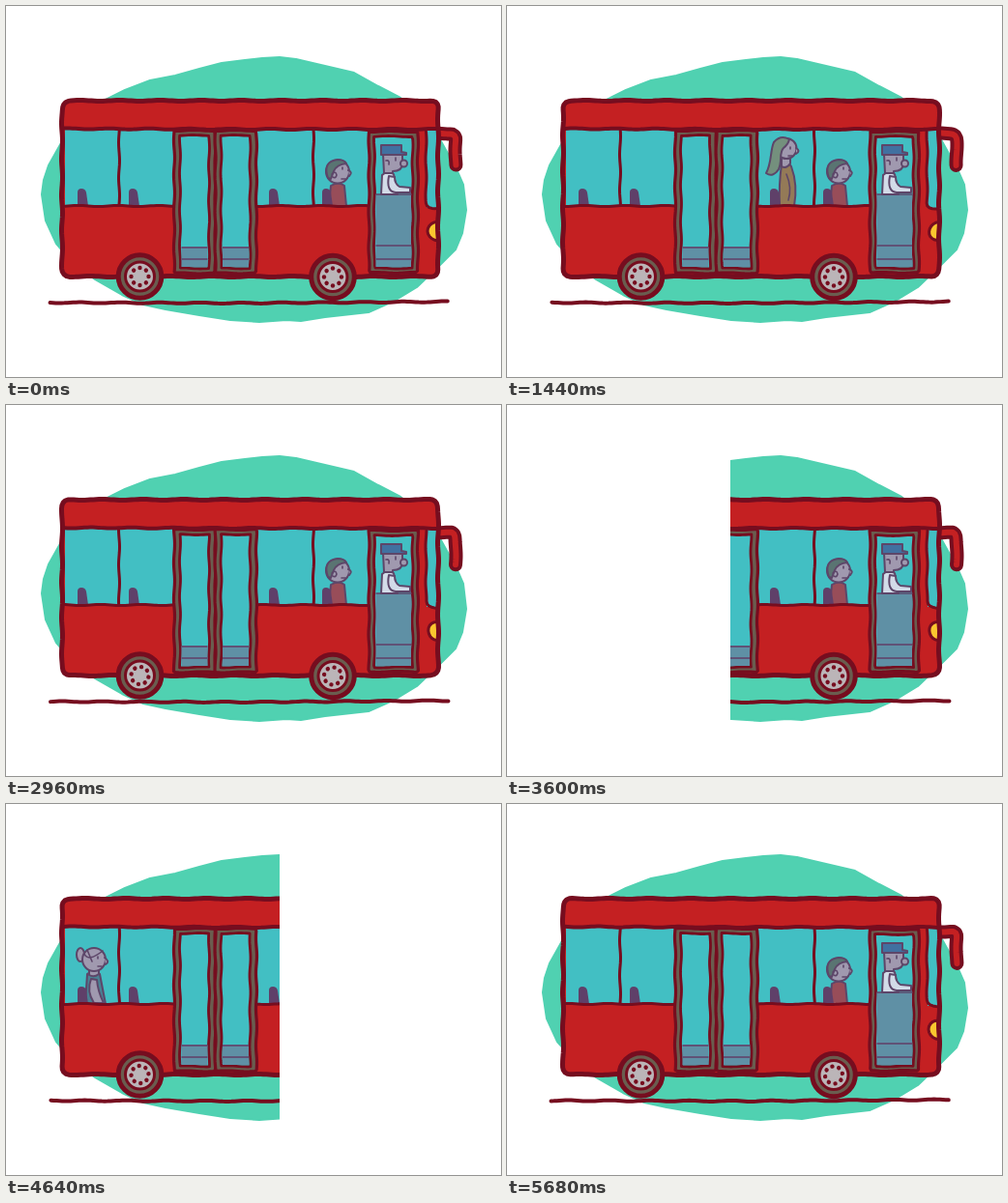
An HTML page for the animation above (5760 ms loop, 512 by 384 pixels).

```html
<!DOCTYPE html>
<html lang="en">
<head>
<meta charset="utf-8">
<title>Bus</title>
<style>
  html, body { margin: 0; height: 100%; overflow: hidden; background: #fff; }
  svg { display: block; width: 100vw; height: 100vh; }
  .ink { stroke: #760d1f; stroke-linecap: round; stroke-linejoin: round; }
  .line { fill: none; }
  .glass { fill: #42bfc3; }
  .frame { fill: #6a5d4f; stroke-width: 3.2; }
  .pane { fill: #42bfc3; stroke-width: 2.8; }
  .step { fill: none; stroke: #605276; stroke-width: 2.2; }
  .person { stroke: #5d4669; stroke-width: 2; stroke-linecap: round; stroke-linejoin: round; }
  .skin { fill: #a099af; }
  .thin { fill: none; stroke-width: 1.6; }
</style>
</head>
<body>
<svg viewBox="0 0 512 384">
  <defs>
    <path id="seat" d="M-4 18V4Q-4 0 0 0Q4 0 5 4L7 18Z" fill="#5f4069"/>
    <g id="door">
      <path class="ink frame" d="M0 129H42.500V276.500H0Z"/>
      <path class="ink pane" d="M6 134H36V271.500H6Z"/>
      <path d="M7.500 250H34.500V270H7.500Z" fill="#5f90a5"/>
      <path class="step" d="M7.500 250H34.500M7.500 262H34.500"/>
    </g>
    <g id="wheel">
      <circle r="22.300" fill="#6a5d4f" stroke="#760d1f" stroke-width="5"/>
      <circle r="15" fill="#bbb5b8" stroke="#760d1f" stroke-width="3"/>
      <g class="bolts" fill="#760d1f"></g>
    </g>
  </defs>

  <path fill="#50d1b1" stroke="#50d1b1" stroke-width="2" stroke-linejoin="round" d="M283 53L265 54 247 56 223 59 200 65 175 72 149 77 123 87 103 97 75 118 58 140 44 165 39 180 37 195 41 222 52 246 70 267 92 283 120 299 142 309 165 314 200 320 232 325 262 327 290 325 305 326 330 322 375 317 402 305 425 291 448 269 465 252 472 235 476 211 473 185 466 169 440 122 408 95 385 83 360 69 330 62 300 55Z"/>

  <path class="ink line" d="M46 307L250 307.500 457 306" stroke-width="4"/>
  <path class="ink line" d="M447 132H459Q465 132 465 139V165" stroke-width="14"/>
  <path class="ink line" d="M447 132H459Q465 132 465 139V165" stroke-width="6" style="stroke:#c42022"/>

  <rect x="58" y="98" width="389" height="182" rx="9" fill="#c42022"/>
  <path class="glass" d="M61 128H174V207H61ZM260 128H375V207H260ZM435 129H446V209H435Z"/>

  <g class="person">
    <path d="M334 207L336 186Q344 181 350 186L352 207Z" fill="#984d59"/>
    <circle class="skin" cx="343" cy="171.500" r="12"/>
    <path class="skin" d="M354 170Q359 172 355 176"/>
    <path d="M333 178Q327 161 343 159Q350 159 352 163Q342 164 339 171L336 179Z" fill="#5a7472"/>
    <path class="thin" d="M337 174Q341 170 342 175Q341 179 338 177M348 167V169M351 179H347"/>
  </g>

  <g class="person passenger">
    <path d="M282 207Q281 185 284 164Q290 159 294 166Q301 185 297 207Z" fill="#947a57"/>
    <path class="skin" d="M284 155V166Q289 169 293 163V155Z"/>
    <circle class="skin" cx="289" cy="147.500" r="10.500"/>
    <path class="skin" d="M299 147Q304 150 299 153"/>
    <path d="M292 138Q283 133 276 141C272 150 274 162 268 173Q275 178 281 169C285 160 281 152 286 147Q291 143 292 138Z" fill="#74907d"/>
    <path class="thin" d="M293 146V148M291 155H295M289 174Q295 188 291 201"/>
  </g>

  <g class="person passenger">
    <path d="M82 207L84 176Q91 170 97 176L103 207Z" fill="#498293"/>
    <ellipse class="skin" cx="77" cy="156" rx="4" ry="7"/>
    <path class="skin" d="M86 169V177Q91 180 96 176V169Z"/>
    <circle class="skin" cx="91" cy="161" r="12"/>
    <path class="skin" d="M102 159Q108 163 103 166"/>
    <path class="skin" d="M88 181Q83 194 91 206H101Q95 194 94 182Z"/>
    <path class="thin" d="M81 155Q85 164 100 152M84 151L89 163M95 158V160M95 168H99"/>
  </g>

  <use href="#seat" x="78" y="189"/>
  <use href="#seat" x="131" y="189"/>
  <use href="#seat" x="276" y="189"/>
  <use href="#seat" x="331" y="189"/>

  <g stroke-width="3">
    <path class="ink line" d="M117 129V206"/>
    <path class="ink line" d="M318 129V206"/>
    <path class="ink line" d="M61 207H174"/>
    <path class="ink line" d="M260 207H375"/>
  </g>
  <use href="#door" x="174"/>
  <use href="#door" x="216.500"/>

  <path class="ink frame" d="M375.500 130H426V276H375.500Z"/>
  <path class="ink pane" d="M381 135H420.500V271.500H381Z"/>
  <path d="M382.500 195H419V270H382.500Z" fill="#5f90a5"/>
  <path class="step" d="M382.500 248H419M382.500 262H419"/>
  <g class="person">
    <path d="M388 195L389 175Q394 170 401 174L405 195Z" fill="#d3dbe8"/>
    <path d="M396 176Q393 192 403 193H418V188L407 187Q402 184 402 177Z" fill="#d3dbe8"/>
    <path class="skin" d="M390 153H410V163Q410 171 400 171V173H391Z"/>
    <circle class="skin" cx="411.500" cy="163" r="3.500"/>
    <path d="M388 144H409V151L414 152V154H388Z" fill="#4170a0"/>
    <path class="thin" d="M403 157V160M393 160Q397 159 396 164M383 195H419"/>
  </g>

  <path class="ink" d="M446 224A9 9 0 0 0 446 243" fill="#fbc62f" stroke-width="3"/>
  <path class="ink line" d="M434.500 130V204Q435 210 446 210" stroke-width="3"/>
  <path class="ink line" d="M60 127L250 127.500 446 127.500" stroke-width="4"/>
  <path class="ink line" d="M67 98H438Q447 98 447 107V271Q447 280 438 280H67Q58 280 58 271V107Q58 98 67 98Z" stroke-width="5"/>
  <use href="#wheel" x="138.500" y="280"/>
  <use href="#wheel" x="338" y="280.500"/>

  <rect id="panel" width="647" height="384" fill="#fff"/>
</svg>
<script>
  const STEP = 80, STEPS = 72, POSES = 4;
  const WIPES = [12, 27, 42, 58];   // steps at which the panel has covered the right side
  const panel = document.getElementById('panel');
  const bolts = document.querySelector('.bolts');
  const [woman, granny] = document.querySelectorAll('.passenger');

  bolts.innerHTML = Array.from({ length: 8 }, (_, i) =>
    `<circle cx="9" r="2.2" transform="rotate(${i * 45})"/>`).join('');

  // Hand-drawn version of a path: resampled and nudged by smooth waves.
  function wobble(path, pose) {
    const length = path.getTotalLength(), count = Math.ceil(length / 3);
    const points = Array.from({ length: count + 1 }, (_, i) => {
      const { x, y } = path.getPointAtLength(length * i / count);
      const dx = .5 * Math.sin(y * .17 + x * .05 + pose * 2.1);
      const dy = .5 * Math.sin(x * .15 + y * .06 + pose * 2.7);
      return `${(x + dx).toFixed(2)} ${(y + dy).toFixed(2)}`;
    });
    return `M${points.join('L')}${/Z$/.test(path.getAttribute('d')) ? 'Z' : ''}`;
  }

  const inked = [...document.querySelectorAll('.ink')].map(path => ({
    path, poses: Array.from({ length: POSES }, (_, pose) => wobble(path, pose))
  }));

  const show = (el, on) => el.setAttribute('visibility', on ? 'visible' : 'hidden');

  function draw(step) {
    const wipe = WIPES.find(s => step >= s - 1 && step <= s + 4);
    panel.setAttribute('x', wipe === undefined ? 600 : 283 - 233 * (step - wipe));
    const scene = WIPES.filter(s => step >= s + 2).length;
    show(woman, scene === 1);
    show(granny, scene === 3);
    bolts.setAttribute('transform', `rotate(${step * 10})`);
    for (const { path, poses } of inked) path.setAttribute('d', poses[step % POSES]);
  }

  let last = -1;
  function tick() {
    const step = Math.floor(performance.now() / STEP) % STEPS;
    if (step !== last) draw(last = step);
    requestAnimationFrame(tick);
  }
  tick();
</script>
</body>
</html>
```
